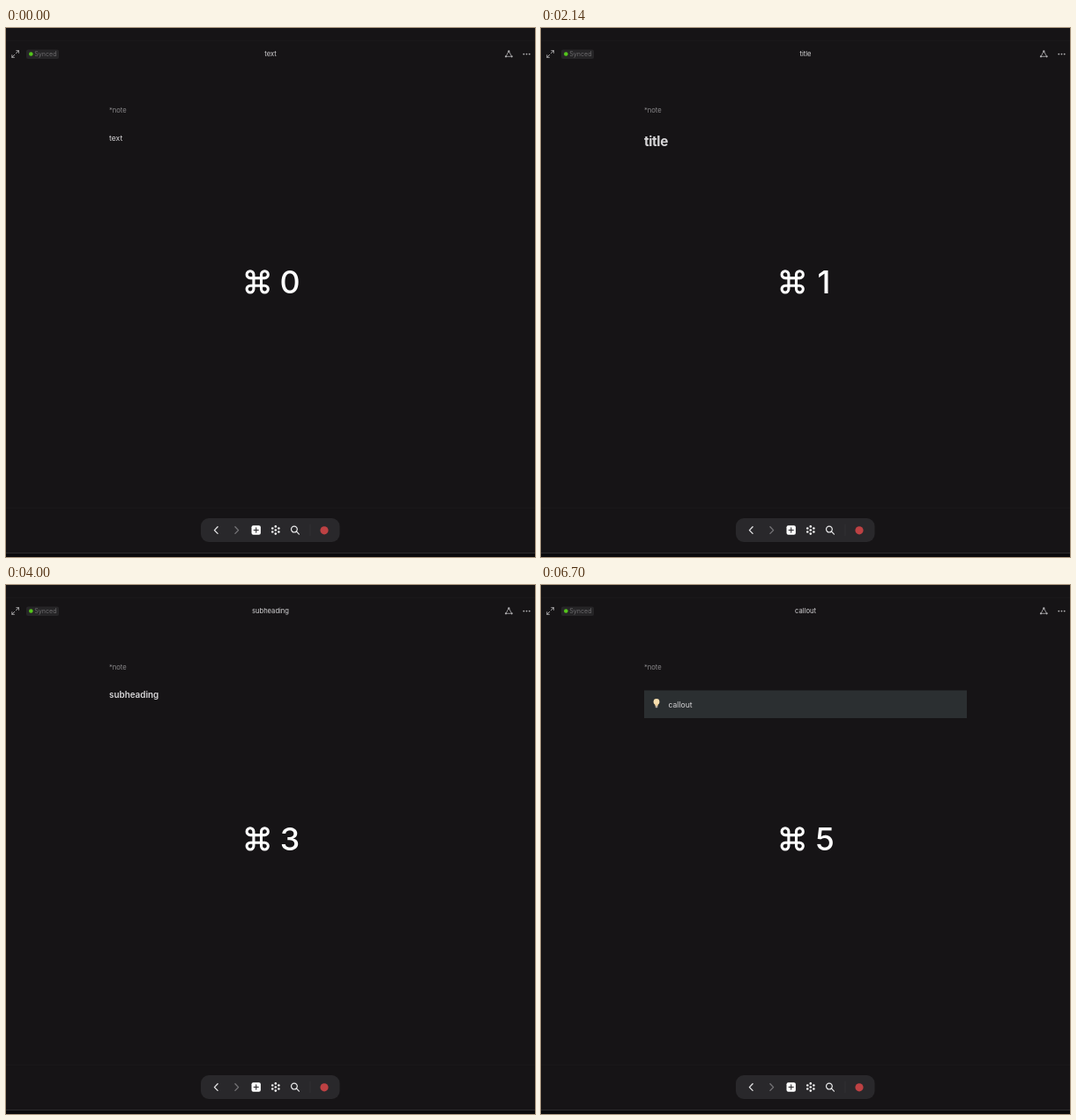
An HTML page with a canvas for the animation above (8000 ms loop, 600x600 px).

```html
<!DOCTYPE html>
<html lang="en">
<head>
<meta charset="utf-8">
<title>Text style shortcuts</title>
<style>
html, body { margin: 0; width: 100%; height: 100%; overflow: hidden; background: #161416; }
canvas { display: block; width: 600px; height: 600px; }
</style>
</head>
<body>
<canvas id="stage" width="600" height="600"></canvas>
<script>
const ctx = document.getElementById('stage').getContext('2d');
const LOOP = 8000;
const styles = [
  { at: 0, word: 'text', size: 8.6, y: 128 },
  { at: 1300, word: 'title', size: 15.3, weight: 700, y: 133.5, spacing: -0.35 },
  { at: 2700, word: 'heading', size: 12, weight: 600, y: 129.7, spacing: -0.1 },
  { at: 4000, word: 'subheading', size: 9.9, weight: 600, y: 127.8 },
  { at: 5300, word: 'highlighted', size: 8.6, x: 132.6, y: 127, decorate: drawQuote },
  { at: 6700, word: 'callout', size: 8.6, x: 144.5, y: 138.5, decorate: drawCallout }
];

function text(str, x, y, size, color, { weight = 400, align = 'left', spacing = 0 } = {}) {
  ctx.font = `${weight} ${size}px Inter, sans-serif`;
  ctx.letterSpacing = `${spacing}px`;
  ctx.textAlign = align;
  ctx.fillStyle = color;
  ctx.fillText(str, x, y);
}

function box(x, y, w, h, color, radius = 0) {
  ctx.fillStyle = color;
  ctx.beginPath();
  ctx.roundRect(x, y, w, h, radius);
  ctx.fill();
}

function dot(x, y, r, color) {
  ctx.fillStyle = color;
  ctx.beginPath();
  ctx.arc(x, y, r, 0, Math.PI * 2);
  ctx.fill();
}

function stroke(path, color, width, x = 0, y = 0) {
  ctx.save();
  ctx.translate(x, y);
  ctx.strokeStyle = color;
  ctx.lineWidth = width;
  ctx.lineCap = ctx.lineJoin = 'round';
  ctx.stroke(new Path2D(path));
  ctx.restore();
}

function drawQuote() {
  box(122.7, 115.5, 1.3, 16.8, '#d0cfd1');
}

function drawCallout() {
  box(117, 119.5, 366, 31.5, '#2b2f31');
  dot(131, 132.5, 3.4, '#f8e0b0');
  box(129.4, 134.5, 3.2, 2.8, '#f3d59d');
  box(129.7, 136.9, 2.6, 2.3, '#b5aca0', 0.8);
}

function drawHeader(word) {
  stroke('M.8 -.8L3.8 -3.8M1.2 -3.8H3.8V-1.2M-.8 .8L-3.8 3.8M-1.2 3.8H-3.8V1.2', '#b4b3b5', 0.9, 10.6, 29.5);
  box(23, 24.5, 37, 10.5, '#262527', 2);
  dot(28.3, 29.5, 2.3, '#54c51c');
  text('Synced', 32.3, 32, 7.1, '#6b6a6c');
  text(word, 300, 32.2, 7.6, '#d5d4d6', { align: 'center' });
  stroke('M-.6 -2.2L-2.8 1.9M.6 -2.2L2.8 1.9M-2 2.8H2', '#b4b3b5', 0.8, 570.3, 29.5);
  for (const [x, y] of [[570.3, 26.5], [567, 32.3], [573.6, 32.3]]) dot(x, y, 1.15, '#b4b3b5');
  for (const x of [587.3, 590.5, 593.7]) dot(x, 29.6, 0.95, '#b4b3b5');
}

function drawShortcut(digit) {
  const loop = 'M-4.3 -4.3H4.3V4.3H-4.3Z' + [[1, 1], [1, -1], [-1, 1], [-1, -1]].map(([sx, sy]) =>
    `M${4.3 * sx} ${4.3 * sy}V${8.2 * sy}A3.9 3.9 0 1 ${sx * sy > 0 ? 0 : 1} ${8.2 * sx} ${4.3 * sy}H${4.3 * sx}`).join('');
  stroke(loop, '#fff', 3.1, 285.2, 287.9);
  text(digit, digit === 1 ? 321 : 322, 301, 35.8, '#fff', { weight: 500, align: 'center' });
}

function drawToolbar() {
  box(221, 556, 157.5, 27, '#29282b', 9);
  stroke('M1.8 -3.8L-1.9 0L1.8 3.8', '#e8e8e9', 1.3, 238.3, 569.6);
  stroke('M-1.8 -3.8L1.9 0L-1.8 3.8', '#777679', 1.3, 261.7, 569.6);
  box(278.5, 564.3, 10.4, 10.4, '#fff', 2);
  stroke('M-2.6 0H2.6M0 -2.6V2.6', '#29282b', 1.1, 283.7, 569.5);
  dot(305.8, 569.5, 1.35, '#f4f4f4');
  for (let i = 0; i < 6; i++) {
    const angle = Math.PI / 6 + i * Math.PI / 3;
    dot(305.8 + 4.1 * Math.cos(angle), 569.5 + 4.1 * Math.sin(angle), 1.3, '#f4f4f4');
  }
  stroke('M3.4 0A3.4 3.4 0 1 1 -3.4 0A3.4 3.4 0 1 1 3.4 0M2.6 2.6L5.5 5.5', '#e8e8e9', 1.2, 326.9, 568.6);
  box(344.5, 563, 1, 13, '#323134');
  dot(361, 569.8, 4.6, '#bd4143');
}

function draw(now) {
  const time = now % LOOP;
  const index = styles.findLastIndex(style => time >= style.at);
  const { word, size, x = 117, y, decorate, ...options } = styles[index];

  box(0, 0, 600, 600, '#161416');
  box(0, 14, 600, 1, '#1a181a');
  box(0, 544, 600, 1, '#1a181a');
  box(0, 595, 600, 1, '#2c2b2d');
  box(0, 596, 600, 4, '#0b0a0c');
  drawHeader(word);
  text('*note', 117, 96.3, 7.6, '#89888a');
  decorate?.();
  text(word, x, y, size, '#d8d7d9', options);
  drawShortcut(index);
  drawToolbar();
  requestAnimationFrame(draw);
}

requestAnimationFrame(draw);
</script>
</body>
</html>
```
